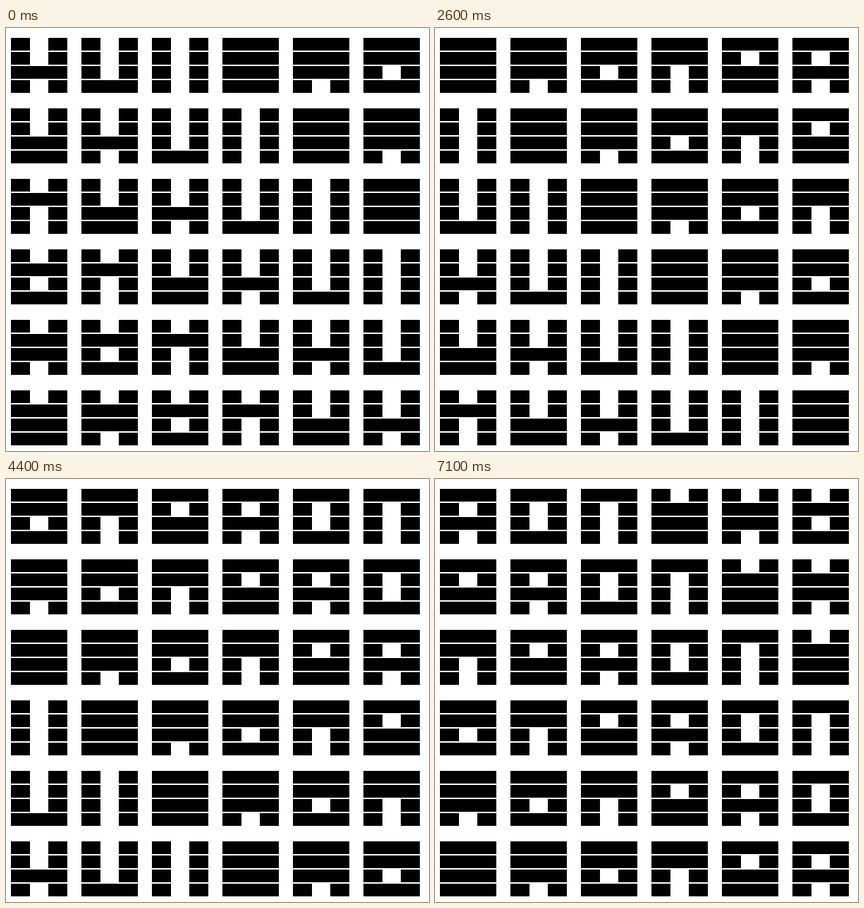
These frames come from a looping animation (600 by 600 pixels, 8 s). An HTML page with a canvas:

```html
<!DOCTYPE html>
<html lang="en">
<head>
<meta charset="utf-8">
<title>Four-bit bars</title>
<style>
  html, body { margin: 0; width: 100%; height: 100%; overflow: hidden; background: #fff; }
  canvas { display: block; width: 600px; height: 600px; }
</style>
</head>
<body>
<canvas id="stage" width="600" height="600"></canvas>
<script>
  const ctx = document.getElementById('stage').getContext('2d');
  const LOOP = 8000;
  const CHANGES = [700, 1700, 2600, 3500, 4400, 5300, 6200, 7100];
  const SIZE = 6, BITS = 4;

  // A set bit is a bar with a gap; the highest bit is on top.
  function drawCell(x, y, value) {
    for (let i = 0; i < BITS; i++) {
      const top = y + i * 20;
      if (value >> (BITS - 1 - i) & 1) {
        ctx.fillRect(x, top, 27, 18);
        ctx.fillRect(x + 53, top, 27, 18);
      } else {
        ctx.fillRect(x, top, 80, 18);
      }
    }
  }

  // Values count up along each row and down each column, modulo 16.
  function draw(step) {
    ctx.fillStyle = '#fff';
    ctx.fillRect(0, 0, 600, 600);
    ctx.fillStyle = '#000';
    for (let row = 0; row < SIZE; row++) {
      for (let col = 0; col < SIZE; col++) {
        drawCell(7 + col * 100, 14 + row * 100, (13 + step + col - row) & 15);
      }
    }
  }

  let shown = -1;
  function tick() {
    const t = performance.now() % LOOP;
    const step = CHANGES.filter(c => c <= t).length;
    if (step !== shown) draw(shown = step);
    requestAnimationFrame(tick);
  }
  tick();
</script>
</body>
</html>
```
